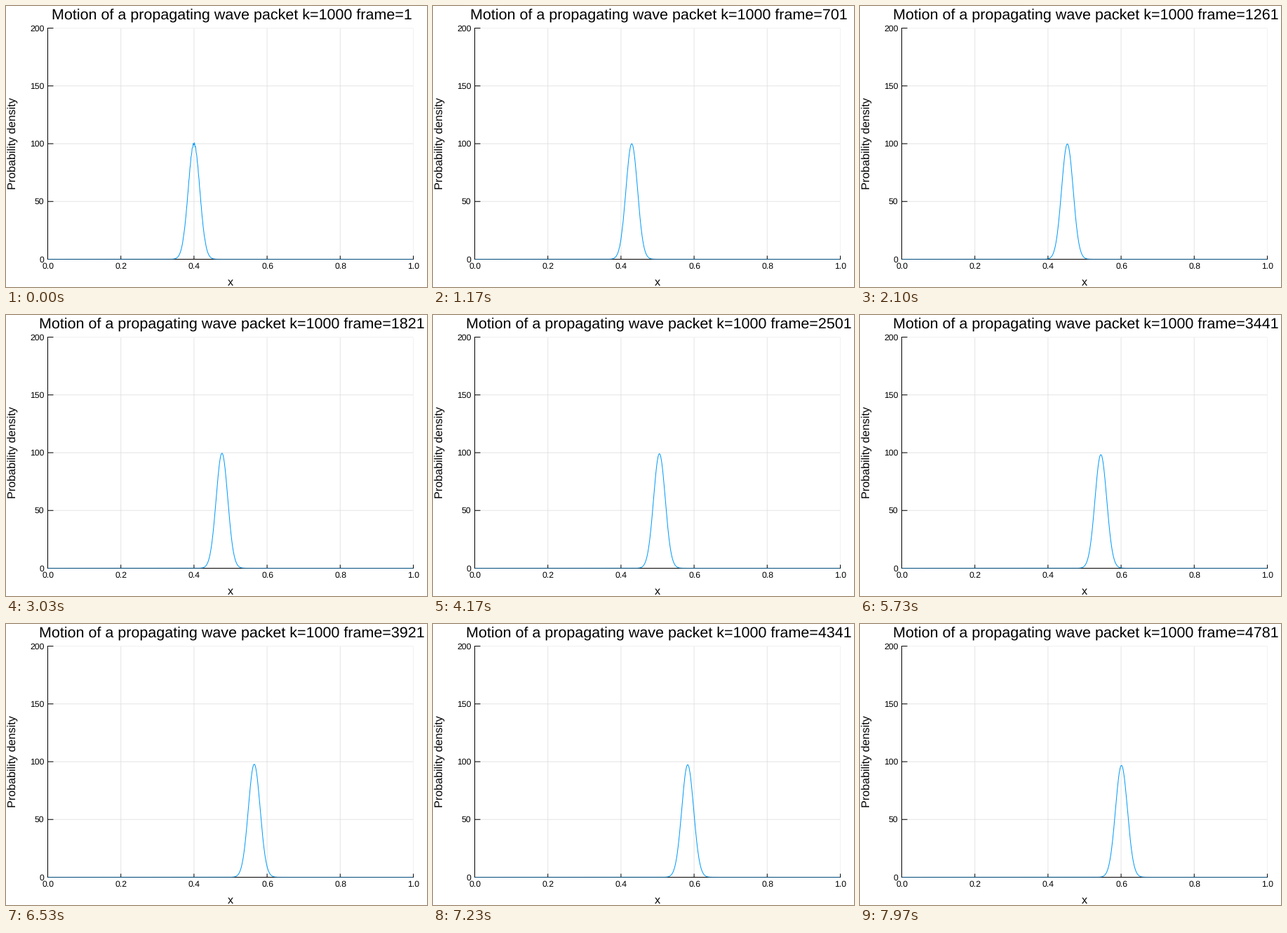
Animation, 600 px wide and 400 px high, one loop 8000 ms. Source, as a matplotlib script:

```python
import numpy as np
import matplotlib.pyplot as plt
from matplotlib.animation import FuncAnimation
from matplotlib.path import Path

W, H, DPI = 600, 400, 100
LOOP_MS, TICK_MS = 8000, 10
STATES, STRIDE = 240, 20
LEFT, RIGHT, TOP, BOTTOM = 59.5, 580.5, 31.5, 360.5
PX = 72 / DPI  # points per pixel
GRID, BLUE = "#e5e5e5", "#009af9"

plt.rcParams["font.family"] = "Liberation Sans"
plt.rcParams["text.hinting"] = "none"


def px_x(x):
    return LEFT + (RIGHT - LEFT) * x


def px_y(p):
    return BOTTOM - (BOTTOM - TOP) * p / 200


def laplacian(f):
    out = np.zeros_like(f)
    out[1:-1] = f[2:] - 2 * f[1:-1] + f[:-2]
    return out


def wave_densities(x, k=1000, x0=0.4, dx=1e-3, dt=5e-8):
    """Leapfrog a free Gaussian packet, keeping every STRIDE-th density."""
    s = dt / (2 * dx**2)
    envelope = 10 * np.exp(-((x - x0) ** 2) / 1e-3)
    re, im = envelope * np.cos(k * x), envelope * np.sin(k * x)
    im = im + s * laplacian(re)
    kept = []
    for step in range((STATES - 1) * STRIDE + 1):
        re = re - s * laplacian(im)
        im_next = im + s * laplacian(re)
        if step % STRIDE == 0:
            kept.append(re**2 + im * im_next)
        im = im_next
    return kept


grid_x = np.arange(1001) * 1e-3
densities = wave_densities(grid_x)

fig = plt.figure(figsize=(W / DPI, H / DPI), dpi=DPI, facecolor="white")
ax = fig.add_axes([0, 0, 1, 1])
ax.set_xlim(0, W)
ax.set_ylim(H, 0)
ax.axis("off")

# A path clip, unlike a rectangle, cuts at half pixels.
plot_area = Path([(LEFT, TOP), (RIGHT, TOP), (RIGHT, BOTTOM),
                  (LEFT, BOTTOM), (LEFT, TOP)], closed=True)


def stroke(xs, ys, color, z, clip=False):
    line = ax.plot(xs, ys, color=color, lw=PX, zorder=z, snap=False,
                   solid_capstyle="butt")[0]
    if clip:
        line.set_clip_path(plot_area, ax.transData)
    return line


def segments(parts, color, z, clip=False):
    """Draw many (x0, y0, x1, y1) pieces as one line with gaps."""
    xs, ys = [], []
    for xa, ya, xb, yb in parts:
        xs += [xa, xb, np.nan]
        ys += [ya, yb, np.nan]
    return stroke(xs, ys, color, z, clip)


def label(x, y, text, size, ha="center", **kw):
    return ax.text(x, y, text, fontsize=size, color="black", ha=ha,
                   va="baseline", **kw)


grid = []
axes = [(LEFT, TOP, LEFT, BOTTOM + 0.5),
        (LEFT - 0.5, BOTTOM, RIGHT + 0.5, BOTTOM)]

for i in range(6):
    x = px_x(i / 5)
    if i:
        grid.append((x, TOP, x, BOTTOM))
    axes.append((x, BOTTOM, x, BOTTOM - 5))
    label(x + 0.5, 374, f"{i / 5:.1f}", 8.8)

for p in range(0, 201, 50):
    y = px_y(p)
    if p:
        grid.append((LEFT, y, RIGHT, y))
    axes.append((LEFT, y, LEFT + 8, y))
    label(54.5, y + 4, str(p), 8.8, ha="right")

segments(grid, GRID, 1, clip=True)
segments(axes, "black", 2)
curve = stroke(px_x(grid_x), px_y(densities[0]), BLUE, 3, clip=True)

label(320, 398, "x", 11.6)
label(14, 195.5, "Probability density", 11.6, rotation=90,
      rotation_mode="anchor")
title = label(322, 18.5, "", 15.47)


def update(tick):
    # Each state begins at its ideal time rounded to the nearest tick.
    i = int((tick + 0.5) * TICK_MS * STATES / LOOP_MS)
    curve.set_ydata(px_y(densities[i]))
    title.set_text("Motion of a propagating wave packet k=1000 "
                   f"frame={1 + STRIDE * i}")
    return curve, title


anim = FuncAnimation(fig, update, frames=LOOP_MS // TICK_MS,
                     interval=TICK_MS, repeat=True, repeat_delay=0,
                     blit=False)
plt.show()
```
